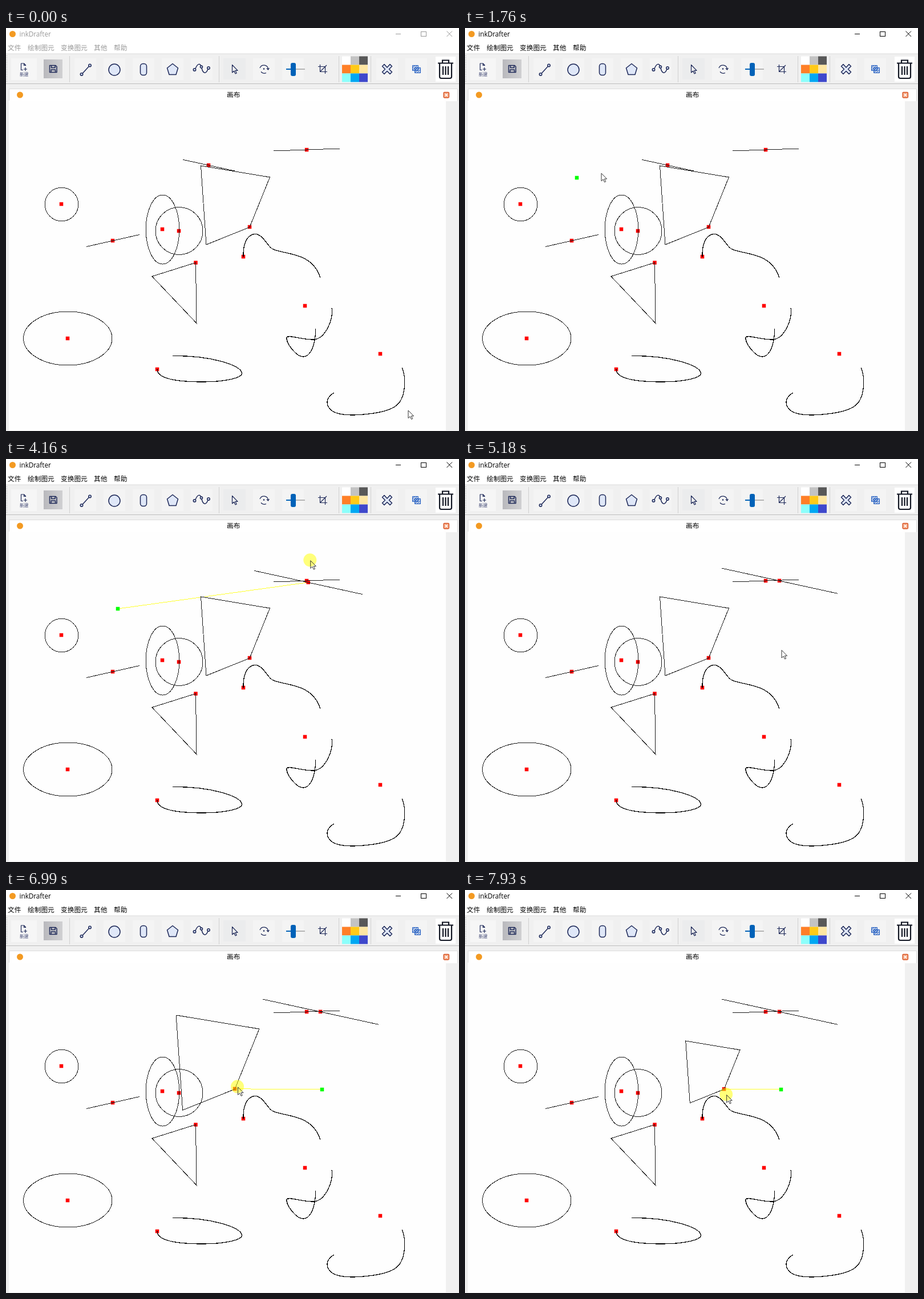
An HTML page that plays this animation: 794x705 px, repeating every 8 s.

```html
<!DOCTYPE html>
<html lang="zh">
<head>
<meta charset="utf-8">
<style>
html, body { margin: 0; width: 100%; height: 100%; overflow: hidden; background: #f0f0f0; }
svg { display: block; width: 794px; height: 705px; }
text { font: 11.7px "Open Sans", "Noto Sans CJK SC", "Noto Sans CJK", sans-serif; }
.shapes { fill: none; stroke: #1c1c1c; shape-rendering: crispEdges; }
.shapes path { stroke: #000; stroke-width: 1.25; }
.icon { fill: none; stroke: #1d2858; stroke-width: 1.5; stroke-linejoin: round; }
.thin { stroke-width: 1.2; }
.tinted { fill: #dfe7f8; }
.slider { stroke: none; fill: #0062b8; }
.chrome { fill: currentColor; }
.chrome path { fill: none; stroke: currentColor; shape-rendering: crispEdges; }
</style>
</head>
<body>
<svg viewBox="0 0 794 705">
  <defs>
    <linearGradient id="pressed"><stop stop-color="#b9b9bd"/><stop offset="1" stop-color="#d0d0d2"/></linearGradient>
    <pattern id="hatch" width="3" height="3" patternUnits="userSpaceOnUse" patternTransform="rotate(-45)">
      <path d="M0 1H3" stroke="#245fc2" stroke-width="1.3"/>
    </pattern>
    <path id="arrow" d="M0 0V13.5L3.2 10.6L5.6 15.5L7.7 14.5L5.4 9.8H9.6Z"/>
  </defs>

  <!-- window frame -->
  <path d="M0 0H794V44H0Z" fill="#fff"/>
  <path d="M0 45.5H794" stroke="#e3e3e3"/>
  <path d="M0 97.5H794" stroke="#bdbdbd"/>
  <path d="M1.5 48V96" stroke="#aaa" stroke-dasharray="1 2"/>
  <path d="M111.5 49V95M373.5 49V95M583.5 49V95M639.5 49V95" stroke="#d0d0d0"/>
  <circle cx="11.5" cy="10.5" r="5.5" fill="#f39a22"/>
  <g id="chrome" class="chrome">
    <text x="23.5" y="14.8">inkDrafter</text>
    <text x="3" y="38.5">文件</text>
    <text x="38" y="38.5">绘制图元</text>
    <text x="96" y="38.5">变换图元</text>
    <text x="154" y="38.5">其他</text>
    <text x="189" y="38.5">帮助</text>
    <path d="M683 10.5H692M727.5 6.500H736.500V14.500H727.500Z"/>
    <path d="M772.5 5.500L782 15M782 5.500L772.500 15" style="shape-rendering:auto"/>
  </g>

  <!-- toolbar -->
  <g id="pads" fill="#f4f4f4"></g>
  <rect x="66" y="55" width="33" height="33" fill="url(#pressed)"/>
  <g class="icon">
    <path class="thin" d="M34.5 66V65L31.5 62H26.5V73.5H30M31.5 62V65.5H34.5M31 72H37M34 69V75"/>
    <path d="M76.5 65.5H87L89 67.5V77.5H76.5ZM79.5 65.5V69.5H86V65.5M79 77.5V73H86.5V77.5"/>
    <path d="M134.5 79L145 67.5"/>
    <g class="tinted">
      <circle cx="132.5" cy="81" r="2.2"/><circle cx="147" cy="65.5" r="2.2"/>
      <circle cx="190" cy="73" r="10"/>
      <rect x="235.5" y="62.5" width="11" height="20" rx="4.5"/>
      <path d="M292 62.5L301.5 70L298 81.5H286L282.5 70Z"/>
    </g>
    <path d="M332 71C336 61 341 61 343 70S350 82 354 72"/>
    <g class="tinted"><circle cx="330.5" cy="73" r="2.2"/><circle cx="342.5" cy="68" r="2"/><circle cx="355" cy="70" r="2.2"/></g>
    <use class="thin" href="#arrow" x="396.5" y="64.5"/>
    <path class="thin" d="M445 70A7.500 7.500 0 0 1 459.500 72M457 70.500L459.500 73L461.500 70M447 76.500A7.500 7.500 0 0 0 456 78.500"/>
    <circle cx="452" cy="71.5" r=".6"/>
    <path d="M508 72H524" style="stroke:#b5b5b5;stroke-width:2"/>
    <path class="slider" d="M491 71H500V73H491Z"/>
    <rect class="slider" x="499" y="61" width="9" height="23" rx="3"/>
    <path class="thin" d="M550.5 64V76.500H563M547 67.500H559.500V80M550.500 76.500L562 65"/>
    <path class="tinted" d="M663 63.5L668 69L673 63.5L676.5 67L671.5 72L676.5 77L673 80.5L668 75.5L663 80.5L659.5 77L664.5 72L659.5 67Z"/>
    <g fill="url(#hatch)" style="stroke:#245fc2;stroke-width:1">
      <rect x="712.5" y="65.5" width="10" height="9"/><rect x="716.5" y="69.5" width="10" height="9"/>
    </g>
  </g>
  <text x="24" y="83.5" fill="#3a4270" style="font-size:7.7px">新建</text>
  <g id="palette"></g>
  <rect x="753" y="50" width="35" height="44" fill="#fff"/>
  <path d="M757 61.5H784M765 61V56.5H776V61M760 61.5V85Q760 88 763 88H778Q781 88 781 85V61.5M766 67V82M770.5 67V82M775 67V82" fill="none" stroke="#111522" stroke-width="2.2"/>

  <!-- canvas window -->
  <path d="M5.5 128V106.500H791.500V128" fill="#fff" stroke="#dcdcdc"/>
  <path d="M5 127H771V704H5Z" fill="#fefefe"/>
  <circle cx="24.5" cy="117" r="5.500" fill="#f39a22"/>
  <text x="387" y="121">画布</text>
  <rect x="767" y="112.5" width="9.5" height="9.5" rx="1.5" fill="#f3a27b" stroke="#d9592c" stroke-width="1.3"/>
  <path d="M769.5 115L774 119.5M774 115L769.5 119.5" stroke="#fff" stroke-width="1.4"/>

  <path id="guide" stroke="#ffff30" shape-rendering="crispEdges"/>
  <g id="handles" fill="red"></g>
  <g class="shapes">
    <circle cx="97.5" cy="308.5" r="29.3"/>
    <circle cx="303.5" cy="355" r="41.5"/>
    <ellipse cx="274.5" cy="352.5" rx="29.3" ry="60.5"/>
    <ellipse cx="108.3" cy="543" rx="77.7" ry="47"/>
    <line x1="141" y1="382.5" x2="234" y2="361.5"/>
    <line x1="469.5" y1="215" x2="585.5" y2="211"/>
    <path style="stroke:inherit;stroke-width:1" d="M332.5 410.5L256 434.5L334 516.5Z"/>
    <path d="M416 400C415 372 426 360.500 437 360.500C450 361 456 378 466 386C486 397 536 390 551 437"/>
    <path d="M265 597C265 615 305 619 345 619C385 619 413.500 612 413.500 604C413 590 360 573 292 573.500"/>
    <path d="M524 486M542.5 526C543 556 533 575 521 575C508 575 490 550 492 541C496 536 520 546 540 545C560 543 574 510 571 490"/>
    <path d="M656 570M575 638C563 645 560 655 566 664C573 675 590 677 610 677C640 676 670 671 682 662C701 650 702 612 694 594"/>
    <polyline id="line"/>
    <polygon id="quad"/>
  </g>
  <rect id="pivot" width="6.5" height="6.5" fill="#0f0"/>
  <g id="pointer">
    <use href="#arrow" x="1" y="1" fill="#fff"/>
    <circle id="halo" r="11.5" fill="#ff0" fill-opacity=".52"/>
    <use href="#arrow" x="1" y="1" fill="none" stroke="#333"/>
  </g>
</svg>
<script>
const LOOP = 8000, TICK = 77.06, LEAD = 45, LAST_TICK = 102, FOCUS_TICK = 5;
const SIZE = 6.5;
const $ = id => document.getElementById(id);
const range = (n, make) => Array.from({ length: n }, (_, i) => make(i)).join('');
const rect = (x, y, w, h, fill = 'inherit', id = '') =>
  `<rect id="${id}" x="${x}" y="${y}" width="${w}" height="${h}" fill="${fill}"/>`;
const handle = (x, y, id) => rect(x - SIZE / 2, y - SIZE / 2, SIZE, SIZE, 'red', id);

$('pads').innerHTML = rect(9, 53, 45, 38, '#f6f6f6') + rect(381, 53, 39, 37, '#ebeced') +
  range(5, i => rect(120 + 51 * i, 53, 38, 38)) +
  range(2, i => rect(433 + 51 * i, 53, 38, 38) + rect(649 + 51 * i, 53, 38, 38));

const colors = ['#fff', '#c3c3c3', '#585858', '#ff7f27', '#ffca18', '#fde6a3', '#8cfffb', '#00a8f3', '#3f48cc'];
$('palette').innerHTML = range(9, i => rect(589 + i % 3 * 15, 49.5 + Math.floor(i / 3) * 15, 15, 15, colors[i]));

// Paths carry their handle at the first point, all other shapes at their centre.
$('handles').innerHTML = [...document.querySelectorAll('.shapes > :not([id])')].map(shape => {
  if (shape.tagName === 'path') return handle(...shape.getAttribute('d').match(/[\d.]+/g).slice(0, 2));
  const box = shape.getBBox();
  return handle(Math.floor(box.x + box.width / 2), Math.floor(box.y + box.height / 2));
}).join('') + handle(0, 0, 'lineHandle') + handle(0, 0, 'quadHandle');

// Each gesture: click a pivot, grab the shape, pull it to a few scales. Times are in ticks.
const gestures = [
  { id: 'line', pivot: [196, 262], anchor: [355, 240], points: [[310, 230.3], [400.5, 250]],
    click: 18, grab: 29, release: 57, hand: s => [199 + 159 * s, 274.6 - 46.6 * s],
    pulls: [[32, 1], [39, .314], [43, 1.02], [55.6, 2.233]] },
  { id: 'quad', pivot: [554, 349], anchor: [427, 348], points: [[341.5, 241], [462.5, 261], [427, 348.5], [351, 379]],
    click: 68, grab: 75, release: Infinity, hand: s => [556 - 125 * s, 383 - 32.5 * s],
    pulls: [[77.5, 1], [83.2, .3], [85, .3], [94.3, 1.925], [100, .55], [102, .787]] }
];

function sample(keys, tick) {
  const next = keys.findIndex(key => key[0] > tick);
  if (next <= 0) return (next ? keys[keys.length - 1] : keys[0]).slice(1);
  const a = keys[next - 1], b = keys[next];
  const u = (tick - a[0]) / (b[0] - a[0]), eased = u * u * (3 - 2 * u);
  return a.slice(1).map((v, i) => v + (b[i + 1] - v) * eased);
}

const scaleAt = (gesture, tick) => sample(gesture.pulls, tick)[0];
const holds = (g, tick) => tick >= g.grab && tick <= g.release;

const route = [[-1, 704, 668], [FOCUS_TICK, 505, 76], ...gestures.flatMap(g => [
  [g.click, ...g.pivot], [g.click + .5, ...g.pivot],
  [g.grab, ...g.hand(1)], [g.release, ...g.hand(scaleAt(g, g.release))]
])];

function cursorAt(tick) {
  const held = gestures.find(g => holds(g, tick));
  return held ? held.hand(scaleAt(held, tick)) : sample(route, tick);
}

const show = (el, on) => el.setAttribute('visibility', on ? 'visible' : 'hidden');

function place(el, [x, y]) {
  el.setAttribute('x', x - SIZE / 2);
  el.setAttribute('y', y - SIZE / 2);
}

function draw(ms) {
  const tick = Math.min(LAST_TICK, Math.floor((ms % LOOP - LEAD) / TICK));
  $('chrome').style.color = tick >= FOCUS_TICK ? '#000' : '#999';
  show($('guide'), false);
  show($('pivot'), false);

  for (const g of gestures) {
    const s = scaleAt(g, tick);
    const scaled = p => p.map((v, i) => g.pivot[i] + (v - g.pivot[i]) * s);
    const anchor = scaled(g.anchor);
    $(g.id).setAttribute('points', g.points.map(scaled).join(' '));
    place($(g.id + 'Handle'), anchor);
    if (tick < g.click || tick > g.release) continue;
    place($('pivot'), g.pivot);
    show($('pivot'), true);
    $('guide').setAttribute('d', `M${g.pivot}L${anchor}`);
    show($('guide'), tick >= g.pulls[0][0]);
  }

  $('pointer').setAttribute('transform', `translate(${cursorAt(tick)})`);
  show($('halo'), gestures.some(g => holds(g, tick) || Math.abs(tick - g.click) <= 1));
}

function loop() {
  draw(performance.now());
  requestAnimationFrame(loop);
}
loop();
</script>
</body>
</html>
```
